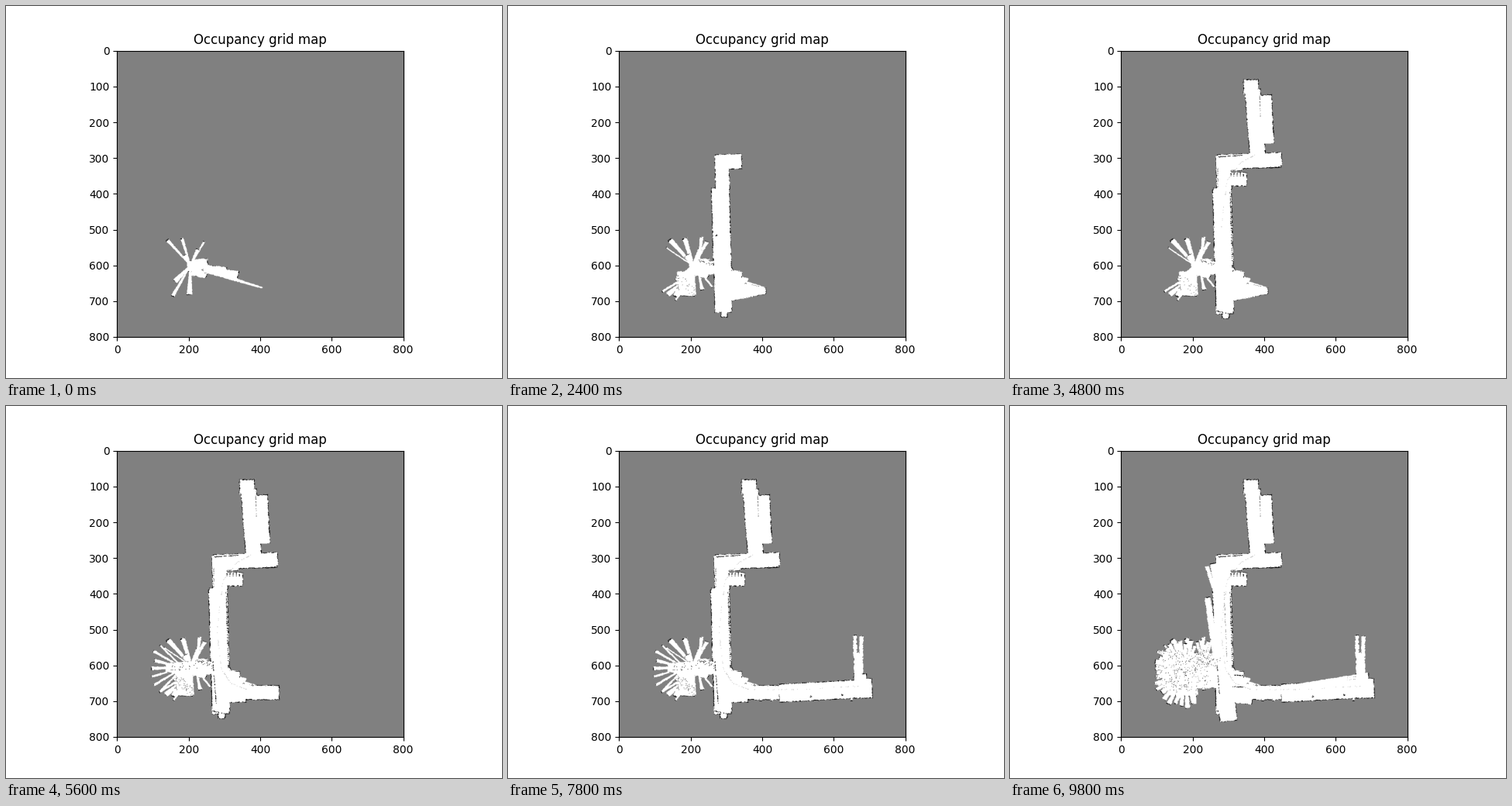
These frames come from a looping animation (640 by 480 pixels, 10 s). A matplotlib script:

```python
import numpy as np
import matplotlib.pyplot as plt
from matplotlib.animation import FuncAnimation

FRAMES, STEP = 50, 200
N = 801
LEFT, TOP, CELL = 143.2, 57.6, 369.6 / N   # map corner and cell size in stage pixels

rng = np.random.default_rng(11)


def blocks(size):
    n = N // size + 1
    return np.kron(rng.random((n, n)), np.ones((size, size)))[:N, :N]


gy, gx = np.mgrid[:N, :N]
X = LEFT + (gx + 0.5) * CELL
Y = TOP + (gy + 0.5) * CELL
PATCH = 0.55 * blocks(7) + 0.45 * rng.random((N, N))
ROUGH = (blocks(4) - 0.5) * 0.7

layers = []
known = np.zeros((N, N), bool)


def add(rows, cols, birth, value):
    layers.append((rows, cols, np.broadcast_to(birth, rows.shape), value))


def strip(t0, t1, a, b, w0, w1=None, ink=0.72, tip=0.72):
    """Free band swept from a to b between t0 and t1, with patchy dark borders."""
    a, b = np.array(a, float), np.array(b, float)
    w1 = w0 if w1 is None else w1
    pad = max(w0, w1) / 2 + 2
    lo = ((np.minimum(a, b) - pad - (LEFT, TOP)) / CELL).astype(int)
    hi = ((np.maximum(a, b) + pad - (LEFT, TOP)) / CELL).astype(int)
    win = np.s_[lo[1]:hi[1], lo[0]:hi[0]]
    length = np.hypot(*(b - a))
    ux, uy = (b - a) / length
    dx, dy = X[win] - a[0], Y[win] - a[1]
    along = dx * ux + dy * uy + ROUGH[win]
    half = (w0 + (w1 - w0) * along / length) / 2
    side = half - np.abs(dy * ux - dx * uy + ROUGH[win])
    end = length - along
    mask = (along >= 0) & (end >= 0) & (side >= 0)
    birth = t0 + (t1 - t0) * along / length

    def dark(gap, amount):
        return (gap < 1) & (PATCH[win] < amount - 0.25 * (gap > 0.5))

    rim = mask & (dark(side, ink) | dark(end, tip)) & ~known[win]
    for cells, value in ((mask, 1.0), (rim, 0.0)):
        r, c = np.nonzero(cells)
        add(r + lo[1], c + lo[0], birth[r, c], value)
    known[win] |= mask & (side > 1) & (end > 1)


def beam(t, a, b, w):
    strip(t, t, a, b, 1.5, w, ink=0)


def dots(t, a, b, n, spread=0.3, shade=0.0):
    """Seeded specks along the line a-b, scattered by spread."""
    u = rng.random((n, 1))
    p = np.array(a) + u * (np.array(b) - a) + rng.uniform(-spread, spread, (n, 2))
    c, r = ((p - (LEFT, TOP)) / CELL).astype(int).T
    r, c = np.r_[r, r, r + 1], np.r_[c, c + 1, c]
    free = known[r, c]
    add(r[free], c[free], t, shade)


def polar(center, angle, radius):
    return center[0] + radius * np.cos(angle), center[1] + radius * np.sin(angle)


# first scan from the start room
robot = (238, 335)
strip(0, 0, (234, 336), (261, 332), 14, 13, ink=0.4)
strip(0, 0, (240, 341), (259, 349), 15, 6, ink=0.4)
strip(0, 0, (255, 338), (285, 341), 8, 8, ink=0.3)
strip(0, 0, (255, 339), (300, 348), 6, 11, ink=0)
strip(0, 0, (256, 341), (331, 364), 6, 2, ink=0, tip=0)
for x, y, w in ((208, 302, 4), (227, 300, 4), (256, 304, 2.5), (215, 375, 4.5),
                (237, 373, 7), (218, 356, 7), (230, 322, 6), (248, 314, 5)):
    beam(0, robot, (x, y), w)
    beam(3, (robot[0] + 2, robot[1]), (x + 1, y), w + 2.5)

# the room fills in, and a wide view opens to the east
strip(1, 3, (236, 338), (266, 338), 18, ink=0.4)
strip(2, 5, (230, 343), (229, 375), 24, ink=0.4)
beam(4, (232, 352), (206, 373), 7)
for i, (x, y, w) in enumerate(((250, 298, 4.5), (199, 369, 3), (251, 367, 5),
                               (264, 363, 2.5), (216, 380, 2.5))):
    beam(2 + i, (245, 340), (x, y), w)
strip(2, 5, (262, 343), (286, 331), 2, 24, ink=0)
strip(2, 5, (264, 342), (302, 366), 4, 33, ink=0, tip=0)
strip(3, 6, (268, 346), (302, 349), 8, 12, ink=0.5)
strip(4, 6, (285, 367), (333, 368), 29, 8, ink=0.4)
dots(5, (245, 328), (264, 333), 24, 3)
dots(6, (217, 346), (220, 368), 16, 2)
dots(6, (222, 350), (240, 370), 24, 6, 0.4)

# corridor, wings and north rooms: start, end, from, to, width
PLAN = [
    (8, 11, (277, 345), (274, 235), 24),
    (8, 10, (277, 343), (278, 396), 23),
    (10, 11, (279, 394), (279, 402), 9),
    (10, 12, (277, 238), (276, 193), 19),
    (11, 12, (267, 202), (302, 201), 20),
    (12, 13, (283, 223), (306, 223), 16),
    (13, 15, (298, 200), (351, 198), 18),
    (13, 16, (320, 198), (313, 108), 21),
    (14, 16, (311, 114), (311, 95), 20),
    (14, 16, (333, 178), (330, 115), 16),
]
beam(9, robot, (204, 312), 1.5)
for t0, t1, a, b, w in PLAN:
    strip(t0, t1, a, b, w)
dots(15, (322, 116), (323, 143), 22, 0.2, 0.3)
dots(12, (269, 296), (269, 296), 8, 1)

# the way back repeats the plan with a small drift
drift = np.array((-1, 2))
for t0, t1, a, b, w in PLAN[6::-1]:
    back = 19 + (15 - t1) * 5 / 7
    strip(back, back, a + drift, b + drift, w)
for x in range(285, 303, 4):
    dots(20, (x, 216), (x, 220), 8, 0.2)
dots(20, (269, 195), (300, 193), 50)
dots(21, (284, 240), (287, 344), 90, 0.4)
dots(21, (268, 206), (268, 234), 20, 0.6, 0.4)
dots(24, (264, 393), (285, 398), 25, 0.5)

# start room once more: a fan of beams to the west
hub = (228, 338)
for i, angle in enumerate(np.linspace(0.74, 1.25, 7) * np.pi):
    beam(25 + i % 4, hub, polar(hub, angle, rng.uniform(36, 44)), rng.uniform(2.5, 5))
strip(26, 28, (246, 338), (206, 338), 18, 12, ink=0.3, tip=0.3)
dots(27, (208, 336), (262, 334), 35, 6)
dots(27, (218, 352), (238, 366), 40, 6, 0.4)

# corridor to the east
strip(26, 27, (278, 349), (302, 349), 13)
strip(26, 27, (281, 340), (300, 368), 10, 14, ink=0, tip=0)
strip(26, 28, (280, 378), (310, 377), 11)
strip(26, 28, (282, 370), (353, 370), 19)
strip(28, 30, (350, 371), (467, 364.5), 24)
beam(28, (288, 350), (318, 360), 2)
for x in (326, 340, 443):
    dots(29, (x - 2, 378), (x + 2, 380), 8)
    beam(29, (x + 1, 372), (x, 381), 3)
dots(27, (267, 330), (271, 384), 60)
dots(30, (350, 382), (350, 372), 12)

# east end and its side branch
strip(31, 33, (452, 365), (470, 364), 26)
strip(33, 34, (452, 356), (452, 318), 12, ink=0.4, tip=0)
strip(34, 35, (448, 323), (447.5, 296), 5, ink=0.3)
strip(34, 35, (455.5, 323), (456, 297), 5, ink=0.3)
strip(34, 34, (450, 350), (463, 350), 9)
for x, y in ((391, 375), (431, 373)):
    dots(34, (x, y), (x, y), 8, 1)

# last pass: everything lands slightly rotated
for i in range(3):
    beam(40 + i / 2, (330, 366), (463, 345.5 + 3.5 * i), 3)
strip(40, 41, (280, 378), (313, 381), 9, ink=0.4)
strip(40, 41, (279, 372), (282, 407), 23)
for top, foot, w in (((254, 207), (266, 245), 5), ((263, 203), (270, 245), 10),
                     ((255, 247), (267, 335), 8)):
    strip(41, 42, foot, top, w, ink=0.25)
dots(42, (276, 240), (280, 330), 50, 0.3, 0.45)
for y in (347, 362):
    dots(42, (287, y), (301, y + 1), 24)

# trail left by the robot
ROUTE = [(318, 192), (298, 202), (280, 225), (272, 290), (278, 340), (290, 358),
         (310, 366), (380, 366), (460, 361)]
for i, (a, b) in enumerate(zip(ROUTE, ROUTE[1:])):
    dots(20 + 1.4 * i, a, b, 16, 0.5, 0.75)

# dense final scan of the start room
hub = (226, 343)
strip(41, 44, (266, 342), (197, 342), 44, 50, ink=0.4, tip=0.4)
for i, angle in enumerate(np.linspace(0.42, 1.62, 22) * np.pi):
    reach = rng.uniform(36, 42) + 6 * max(np.sin(angle), 0)
    beam(41 + i % 7, hub, polar(hub, angle, reach), rng.uniform(4, 7))
for i in range(5):
    beam(43 + i, (250, 335), (241 + 5 * i, rng.uniform(299, 308)), 4)
for i in range(3):
    dots(43 + 2 * i, (200, 342), (242, 342), 45, 26)
    dots(43 + 2 * i, (200, 342), (242, 342), 60, 26, 0.45)
    dots(44 + 2 * i, (242, 322), (262, 326), 40, 12, 0.3)
beam(49, (236, 345), (238, 385), 6)


def paint(k):
    grid = np.full((N, N), 0.5)
    for rows, cols, birth, value in layers:
        on = birth <= k
        grid[rows[on], cols[on]] = value
    return grid


fig, ax = plt.subplots(figsize=(6.4, 4.8), dpi=100)
ax.set_title("Occupancy grid map")
image = ax.imshow(paint(0), cmap="gray", vmin=0, vmax=1)


def update(k):
    image.set_data(paint(k))
    return [image]


anim = FuncAnimation(fig, update, frames=FRAMES, interval=STEP, repeat=True,
                     repeat_delay=0, blit=False)
plt.show()
```
